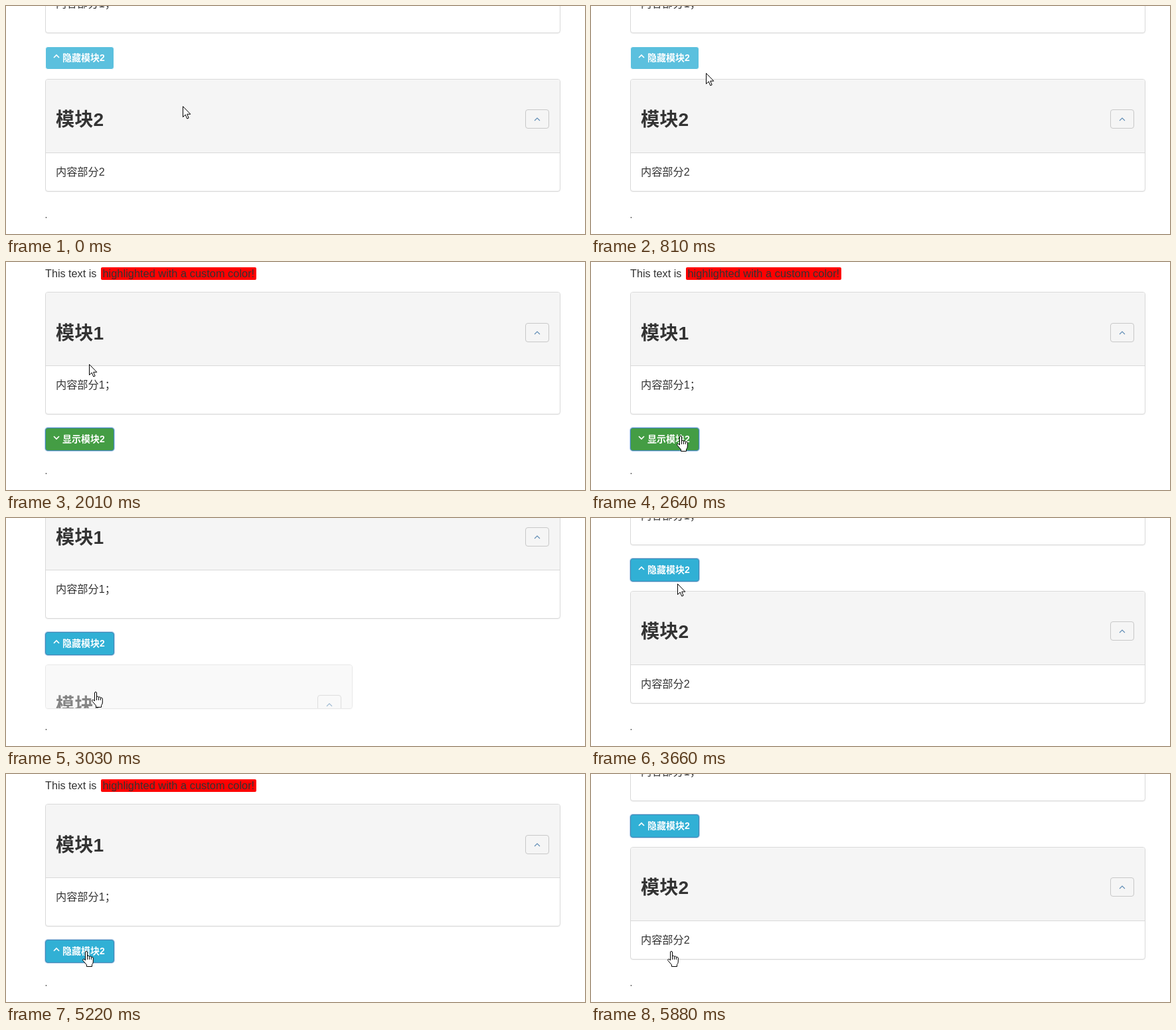
Animation, 872 px wide and 344 px high, one loop 5.91 s. Source, as an HTML page:

```html
<!DOCTYPE html>
<html lang="zh-CN">
<head>
<meta charset="utf-8">
<title>Toggle panel</title>
<style>
html, body { margin: 0; width: 100%; height: 100%; overflow: hidden; background: #fff; }
body {
  position: relative; color: #333; white-space: nowrap;
  font: 16.2px/28px "Liberation Sans", Arial, "Noto Sans CJK SC", "Noto Sans CJK", sans-serif;
}
body * { box-sizing: border-box; }
#page, #page *, #dot, #cursor { position: absolute; }
#page { left: 0; top: 0; width: 872px; height: 344px; }
svg { overflow: visible; fill: none; }

.intro { left: 59px; top: 3px; }
#page mark {
  left: 143px; top: 8px; height: 19px; line-height: 19px; padding: 0 2.5px;
  background: #f00; border-radius: 2px; color: #333; font-size: 16.4px;
}

.panel {
  left: 59px; width: 776px; overflow: hidden; background: #fff;
  border: 1px solid #d9d9d9; border-radius: 4px; box-shadow: 0 1px 1px rgba(0, 0, 0, .05);
}
#one { top: 45px; height: 185px; }
#two { top: 299px; }
.head { left: 0; top: 0; width: 100%; height: 111px; background: #f5f5f5; border-bottom: 1px solid #d9d9d9; }
.head b { left: 15px; top: 40px; font-size: 28.2px; line-height: 40px; }
.head i { right: 16px; top: 45px; width: 36px; height: 29px; border: 1px solid #c8c8c8; border-radius: 4px; }
.head svg { left: 13px; top: 11.5px; stroke: #5f8cb5; stroke-width: 1.1; }
#one b { top: 41px; }
#one i { top: 46px; }
.text { left: 15px; top: 125px; height: 29px; width: 200px; overflow: hidden; }

#toggle {
  left: 59px; top: 250px; width: 104px; height: 35px; border: 1px solid; border-radius: 4px;
  color: #fff; font-size: 14px; font-weight: bold; line-height: 33px;
}
#toggle span { left: 25px; top: 0; }
#toggle svg { left: 12px; top: 12px; stroke: #fff; stroke-width: 1.7; }
.info { background: #5bc0de; border-color: #46b8da; }
.info.active { background: #31b0d5; border-color: #269abc; }
.success { background: #449d44; border-color: #398439; }
#toggle.focus { border-color: #4187b4; box-shadow: 0 0 0 1px rgba(90, 150, 215, .4); }

#dot { left: 58.5px; top: 305px; font-size: 14px; line-height: 20px; }
#cursor { left: 0; top: 0; width: 20px; height: 26px; }
#cursor path { fill: #fff; stroke: #000; stroke-width: 1; stroke-linejoin: round; }
</style>
</head>
<body>
<div id="page">
  <div class="intro">This text is</div>
  <mark>highlighted with a custom color!</mark>
  <div class="panel" id="one">
    <div class="head"><b>模块1</b><i><svg width="8" height="4"><path d="M0 4L4 0L8 4"/></svg></i></div>
    <div class="text">内容部分1；</div>
  </div>
  <div id="toggle"><svg width="8" height="4"><path id="mark"/></svg><span id="label"></span></div>
  <div class="panel" id="two">
    <div class="head"><b>模块2</b><i><svg width="8" height="4"><path id="chevron"/></svg></i></div>
    <div class="text" id="content">内容部分2</div>
  </div>
</div>
<div id="dot">.</div>
<svg id="cursor">
  <path id="arrow" d="M.5 .5V16.5L4.2 13L6.8 19L9.2 18L6.7 12.2H11.8Z"/>
  <g id="hand" transform="translate(-6 0)">
    <path d="M4.5 2Q4.5 .5 6 .5T7.5 2V8Q8 7 9.3 7.2Q10.4 7.4 10.4 8.6Q11 7.8 12.2 8Q13.3 8.3 13.3 9.5Q14 8.8 15 9.2Q16.3 9.7 16.3 11V16Q16.3 19 14.5 20.5V23.5H6.5V21L1 14.5Q.2 13 1.3 12.3Q2.5 11.8 4.5 14Z"/>
    <path d="M7.5 8V13M10.4 8.6V13M13.3 9.5V13"/>
  </g>
</svg>
<script>
const LOOP = 5910, STEP = 30, FADE = 450;
const FULL = 170, HEAD = 112, GAP = 19, WIDTH = 776;
const UP = 'M0 4L4 0L8 4', DOWN = 'M0 0L4 4L8 0';
const HOVER = 1020;

const clicks = [
  { at: 1497, show: false },
  { at: 2777, show: true },
  { at: 4092, show: false },
  { at: 5208, show: true }
];

// time, x, y of the pointer tip
const path = [
  [0, 266, 151], [300, 266, 151], [1150, 124, 74], [1850, 124, 74],
  [2205, 126, 262], [2500, 135, 262], [3180, 135, 262], [3780, 129, 82],
  [4570, 129, 82], [5060, 121, 267], [LOOP, 121, 267]
];
// spans in which the pointer is a hand
const hands = [[HOVER, 1870], [2160, 3200], [3680, 4590], [4980, LOOP]];

const $ = id => document.getElementById(id);
const swing = x => .5 - Math.cos(Math.PI * Math.min(1, Math.max(0, x))) / 2;

function pointer(t) {
  const n = path.findIndex(k => k[0] > t);
  const [t0, x0, y0] = path[n - 1], [t1, x1, y1] = path[n];
  const e = swing((t - t0) / (t1 - t0));
  return [x0 + (x1 - x0) * e, y0 + (y1 - y0) * e];
}

function draw(t) {
  const last = clicks.filter(c => c.at <= t).pop();
  const shown = !last || last.show;
  const age = last ? t - last.at : FADE;
  const e = swing(age / FADE);
  const p = shown ? e : 1 - e;

  // While opening, only the heading counts; the body joins at the end.
  const height = (shown && age < FADE ? HEAD : FULL) * p;
  const shift = Math.round(height + GAP * p);
  $('page').style.transform = `translateY(${-shift}px)`;

  const two = $('two').style;
  two.display = p > .005 ? 'block' : 'none';
  two.width = Math.round(WIDTH * p) + 'px';
  two.height = Math.round(height) + 'px';
  two.opacity = p;
  $('content').style.height = 29 * (shown ? 1 : 1 - swing(age * 3 / FADE)) + 'px';

  const icon = shown ? UP : DOWN;
  $('mark').setAttribute('d', icon);
  $('chevron').setAttribute('d', icon);
  $('label').textContent = shown ? '隐藏模块2' : '显示模块2';
  $('toggle').className = (shown ? 'info' : 'success') +
    (t >= HOVER ? ' active' : '') + (last ? ' focus' : '');

  const [x, y] = pointer(t).map(Math.round);
  const hand = hands.some(([a, b]) => t >= a && t < b);
  $('cursor').style.transform = `translate(${x}px, ${y}px)`;
  $('hand').style.display = hand ? '' : 'none';
  $('arrow').style.display = hand ? 'none' : '';
}

function tick() {
  draw(Math.floor(performance.now() % LOOP / STEP) * STEP);
  requestAnimationFrame(tick);
}
tick();
</script>
</body>
</html>
```
